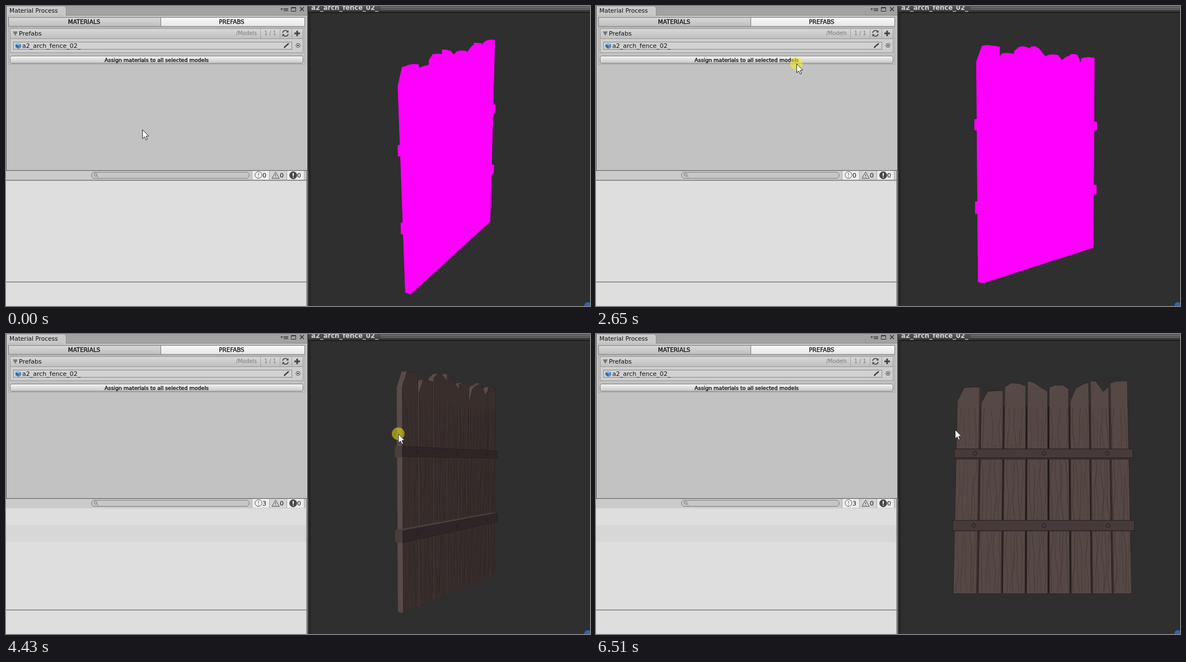
Recreate the animation shown at these times as an HTML page with a canvas. Size 1043x537 px, loop 6590 ms.

```html
<!DOCTYPE html>
<html>
<head>
<meta charset="utf-8">
<style>
html, body { margin: 0; width: 100%; height: 100%; overflow: hidden; background: #2f2f2f }
svg, canvas { position: absolute; left: 0; top: 0 }
text { font: 11px "DejaVu Sans", sans-serif; fill: #111; white-space: pre }
.heavy { stroke: #111; stroke-width: .35; text-anchor: middle }
.dim { font-size: 9.6px; fill: #7c7c7c }
</style>
</head>
<body>
<svg width="1043" height="537">
  <defs>
    <linearGradient id="btn" x2="0" y2="1"><stop stop-color="#f4f4f4"/><stop offset="1" stop-color="#c6c6c6"/></linearGradient>
    <linearGradient id="bar" x2="0" y2="1"><stop stop-color="#d8d8d8"/><stop offset="1" stop-color="#bfbfbf"/></linearGradient>
    <linearGradient id="on" x2="0" y2="1"><stop stop-color="#fafafa"/><stop offset="1" stop-color="#e6e6e6"/></linearGradient>
    <linearGradient id="head" x2="0" y2="1"><stop stop-color="#555"/><stop offset="1" stop-color="#3c3c3c"/></linearGradient>
  </defs>

  <!-- preview pane -->
  <rect x="540" width="503" height="10" fill="url(#head)"/>
  <path d="M540 11.5H1043" stroke="#222" stroke-width="3"/>
  <path d="M669 2.5H1043M669 5.5H1043" stroke="#999"/>
  <path d="M669 3.5H1043M669 6.5H1043" stroke="#333"/>
  <text x="545" y="7" style="font-weight:bold;font-size:11.6px;fill:#d4d4d4">a2_arch_fence_02_</text>
  <path d="M542.5 10V537" stroke="#262626" stroke-width="4"/>
  <circle cx="1039" cy="536" r="6" fill="#2467b8"/>

  <!-- console -->
  <rect y="294" width="537" height="243" fill="#dedede"/>
  <rect y="295" width="537" height="17" fill="#cbcbcb"/>
  <rect x="152.5" y="297.5" width="282" height="11" rx="5.5" fill="#c6c6c6" stroke="#7c7c7c"/>
  <g fill="none" stroke="#777"><circle cx="160" cy="302" r="2.5"/><path d="M162 304l3 3"/></g>
  <rect x="439" y="295" width="31" height="16" fill="#ededed"/>
  <rect x="470" y="295" width="31" height="16" fill="#d4d4d4"/>
  <rect x="501" y="295" width="31" height="16" fill="#ededed"/>
  <path d="M439.5 295v16M470.5 295v16M501.5 295v16M532.5 295v16" stroke="#aaa"/>
  <g fill="#f4f4f4" stroke="#555">
    <circle cx="451" cy="302.5" r="6"/><path d="M451 299v4.500M451 305v1.500"/>
    <path d="M475 308.500L481.500 297L488 308.500Z" fill="#cfcfcf"/><path d="M481.500 301v4M481.500 306v1"/>
    <circle cx="513" cy="303" r="6.5" fill="#484848"/><path d="M513 299v5M513 305.500v1.500" stroke="#fff" stroke-width="2"/>
  </g>
  <text id="count" x="458" y="307">0</text>
  <text x="489" y="307">0</text>
  <text x="520" y="307">0</text>
  <path id="empty" d="M0 312H537" stroke="#4a4a4a"/>
  <rect id="row" y="342" width="537" height="30" fill="#d7d7d7"/>
  <path d="M0 494H537" stroke="#4a4a4a"/>
  <path d="M538 294V537" stroke="#777" stroke-width="3"/>

  <!-- tool window -->
  <rect width="539" height="294" fill="#c2c2c2"/>
  <rect width="539" height="16" fill="#a2a2a2"/>
  <path d="M1 16V1H104L107 4V16Z" fill="#c9c9c9"/>
  <path d="M107.500 3V16M107 16.500H539" stroke="#8c8c8c"/>
  <path d="M.5 0V294M0 294.500H539M538.500 0V294" stroke="#555"/>
  <text x="6" y="12" style="font-size:10.6px">Material Process</text>
  <g stroke="#333" fill="none">
    <path d="M496 4.500h8M496 6.500h8M496 8.500h8"/><path d="M490 4.500h5l-2.500 3z" fill="#333" stroke="none"/>
    <path d="M509.500 2.500h8v7h-8zM509 3.500h9"/><path d="M525 2l7 7M532 2l-7 7" stroke-width="1.5"/>
  </g>
  <g stroke="#7d7d7d">
    <rect x="4.5" y="20.5" width="272" height="16" fill="url(#bar)"/>
    <rect x="276.5" y="20.5" width="257" height="16" fill="url(#on)"/>
    <rect x="4.5" y="38.5" width="529" height="66" fill="none" stroke="#a9a9a9"/>
    <rect x="7.5" y="58.5" width="523" height="25" fill="#cecece" stroke="#9a9a9a"/>
    <rect x="7.5" y="40.5" width="523" height="18" fill="url(#bar)" stroke="#999"/>
    <rect x="13.5" y="64.5" width="497" height="13" fill="#d2d2d2" stroke="#888"/>
    <rect x="7.5" y="89.5" width="523" height="13" rx="3" fill="url(#btn)"/>
    <path d="M454.500 41V58M489.500 41V58M510.500 41V58" stroke="#a4a4a4"/>
  </g>
  <text class="heavy" x="139.5" y="32" style="font-size:10.3px">MATERIALS</text>
  <text class="heavy" x="403" y="32" style="font-size:10.3px">PREFABS</text>
  <text class="heavy" x="269" y="99.5" style="font-size:9.5px">Assign materials to all selected models</text>
  <path d="M12 45.500h9l-4.500 8z" fill="#777"/>
  <text x="23" y="53">Prefabs</text>
  <text class="dim" x="411" y="52">/Models</text>
  <text class="dim" x="461" y="52">1 / 1</text>
  <g fill="none" stroke="#444" stroke-width="1.5">
    <path d="M494 48a5 5 0 0 1 9-2M504 50a5 5 0 0 1-9 2"/>
    <path d="M504.500 43v4.500h-4zM493.500 55v-4.500h4z" fill="#444" stroke="none"/>
    <path d="M520 44v10M515 49h10" stroke-width="3"/>
    <path d="M497 75l1-2 7-6" stroke-width="2.5"/>
    <circle cx="521.5" cy="70.5" r="3.5" stroke-width="1" fill="#ddd"/>
  </g>
  <circle cx="521.5" cy="70.5" r="1.2"/>
  <path d="M17 68.500l5-2 5 2v5l-5 3-5-3z" fill="#39699b"/>
  <path d="M17 68.500l5-2 5 2-5 2z" fill="#8fbce4"/>
  <path d="M22 70.500l5-2v5l-5 3z" fill="#4f8ac4"/>
  <text x="29" y="75">a2_arch_fence_02_</text>
</svg>
<canvas id="stage" width="1043" height="537"></canvas>

<script>
const LOOP = 6590, LOGGED = 2960, TEXTURED = 3430;
const BOTTOM = 186, DEPTH = 5, TURN = .27;
const $ = id => document.getElementById(id);
const ctx = $('stage').getContext('2d');

// Pointer stops: time, x, y, and 1 when the button is held until the next stop.
const STOPS = [
  [0, 243, 221], [220, 320, 216], [540, 320, 216], [830, 410, 245], [910, 410, 245],
  [1240, 740, 244, 1], [1310, 740, 244, 1], [1535, 790, 244],
  [1690, 733, 261, 1], [2020, 681, 180, 1], [2170, 644, 203],
  [2320, 369, 117], [2500, 358, 103], [2650, 358, 103, 1], [2800, 358, 103],
  [3290, 671, 181, 1], [3360, 671, 181, 1], [3640, 659, 182, 1], [3890, 809, 196, 1],
  [4100, 885, 195, 1], [4360, 720, 180, 1], [4970, 552, 168, 1], [5670, 532, 165, 1],
  [6100, 468, 148, 1], [6280, 484, 143], [6360, 477, 158], [6510, 641, 171], [LOOP, 641, 171]
];

// Every drag turns the fence in proportion to the pointer's travel.
function stateAt(t) {
  const s = { yaw: 61.2, pitch: 19 };
  for (let i = 0; i + 1 < STOPS.length && STOPS[i][0] <= t; i++) {
    const [t0, x0, y0, held] = STOPS[i], [t1, x1, y1] = STOPS[i + 1];
    const u = Math.min(1, (t - t0) / (t1 - t0)), dx = (x1 - x0) * u, dy = (y1 - y0) * u;
    Object.assign(s, { x: x0 + dx, y: y0 + dy, held });
    if (held) {
      s.yaw += TURN * dx;
      s.pitch += TURN * dy;
    }
  }
  return s;
}

const rand = n => { const s = Math.sin(n * 127.1) * 43758.5453; return s - Math.floor(s); };
const box = (x0, y0, x1, y1) => [[x0, y0], [x1, y0], [x1, y1], [x0, y1]];

// Heights along the top of each plank, at the same four fractions of its width.
const TOPS = [
  [158, 183, 184, 184], [154, 176, 177, 177], [184, 192, 191, 186], [196, 193, 183, 176],
  [184, 188, 188, 181], [158, 182, 190, 193], [196, 195, 176, 185], [192, 195, 196, 196]
];
const edge = i => -157 + 39.7 * i + 8 * Math.sin(Math.PI * i / 7);
const PLANKS = TOPS.map((top, i) => {
  const left = edge(i), right = i < 7 ? edge(i + 1) - 3 : 152;
  const crest = top.map((h, k) => [left + (right - left) * [0, .3, .7, 1][k], -h]);
  return { left, right, outline: [...crest, [right, BOTTOM], [left, BOTTOM]] };
});

function poly(pts, fill, line = fill, width = .7) {
  ctx.beginPath();
  pts.forEach(p => ctx.lineTo(...p));
  ctx.closePath();
  ctx.fillStyle = fill;
  ctx.fill();
  ctx.strokeStyle = line;
  ctx.lineWidth = width;
  ctx.stroke();
}

function drawFence(yaw, pitch, wood) {
  const rad = Math.PI / 180;
  const sinA = Math.sin(yaw * rad), cosA = Math.cos(yaw * rad);
  const sinB = Math.sin(pitch * rad), cosB = Math.cos(pitch * rad);
  const front = cosA > 0 ? -1 : 1;
  const faceLight = .66 + .05 * Math.max(0, -pitch), sideLight = .7 + .3 * Math.abs(sinA);
  const shade = (rgb, k) => wood ? `rgb(${rgb.map(v => v * k | 0)})` : '#f0f';
  const ink = wood ? 'rgba(24,17,16,.75)' : '#f0f';

  function project(x, y, z) {
    const px = x * cosA - z * sinA, d = x * sinA + z * cosA;
    const s = 900 / (900 + d * cosB + y * sinB);
    return [800 + px * s, 275 + (y * cosB - d * sinB) * s];
  }
  const face = (pts, z) => pts.map(([x, y]) => project(x, y, z));

  function solid(pts, depth, rgb) {
    const near = face(pts, depth * front), far = face(pts, -depth * front);
    const side = shade(rgb, 1.1 * sideLight);
    poly(far, side);
    near.forEach((p, i) => {
      const j = (i + 1) % near.length;
      poly([p, near[j], far[j], far[i]], side);
    });
    poly(near, shade(rgb, faceLight), ink);
  }

  function grain({ left, right }, n) {
    ctx.lineWidth = .8;
    for (let k = 0; k < 5; k++) {
      const seed = n * 9 + k + 1;
      const mid = left + (right - left) * (k + .6 + .5 * rand(seed)) / 5.6;
      const start = -145 + 150 * rand(seed + 70) * (k % 2);
      ctx.strokeStyle = `rgba(24,16,15,${.15 + .25 * rand(seed + 20)})`;
      ctx.beginPath();
      for (let y = start; y <= BOTTOM; y += 8)
        ctx.lineTo(...project(mid + 1.8 * Math.sin(y / 24 + seed * 2) + Math.sin(y / 11 + seed), y, DEPTH * front));
      ctx.stroke();
    }
  }

  poly(face(box(-154, -150, 150, BOTTOM - 1), 3), wood ? '#1b1615' : '#f0f');

  const order = PLANKS.map((p, i) => i);
  if (sinA > 0) order.reverse();
  for (const i of order) {
    solid(PLANKS[i].outline, DEPTH, [85, 72, 69]);
    if (wood) grain(PLANKS[i], i);
  }
  for (const [y, half] of [[-61, 8], [68, 9]]) {
    solid(box(-160, y - half, 159, y + half), 7, [70, 59, 58]);
    if (!wood) continue;
    for (const x of [-123, 0, 113]) {
      const ring = Array.from({ length: 10 }, (_, i) =>
        [x + 3.5 * Math.cos(i * Math.PI / 5), y + 3.5 * Math.sin(i * Math.PI / 5)]);
      poly(face(ring, 7.5 * front), shade([66, 59, 60], faceLight), '#241d1d', 1);
    }
  }
}

function drawPointer({ x, y, held }) {
  if (held) {
    ctx.fillStyle = 'rgba(255,246,0,.5)';
    ctx.beginPath();
    ctx.arc(x, y, 11.3, 0, 7);
    ctx.fill();
  }
  const arrow = [[0, 0], [0, 16], [3.6, 12.6], [6.2, 18.2], [8.6, 17.2], [6.2, 11.6], [11, 11.4]];
  poly(arrow.map(([u, v]) => [x + u + .5, y + v + .5]), '#fff', '#222', 1);
}

function draw() {
  const t = performance.now() % LOOP, logged = t >= LOGGED, state = stateAt(t);
  $('count').textContent = logged ? 3 : 0;
  $('row').style.display = logged ? '' : 'none';
  $('empty').style.display = logged ? 'none' : '';
  ctx.clearRect(0, 0, 1043, 537);
  drawFence(state.yaw, state.pitch, t >= TEXTURED);
  drawPointer(state);
  requestAnimationFrame(draw);
}
draw();
</script>
</body>
</html>
```
